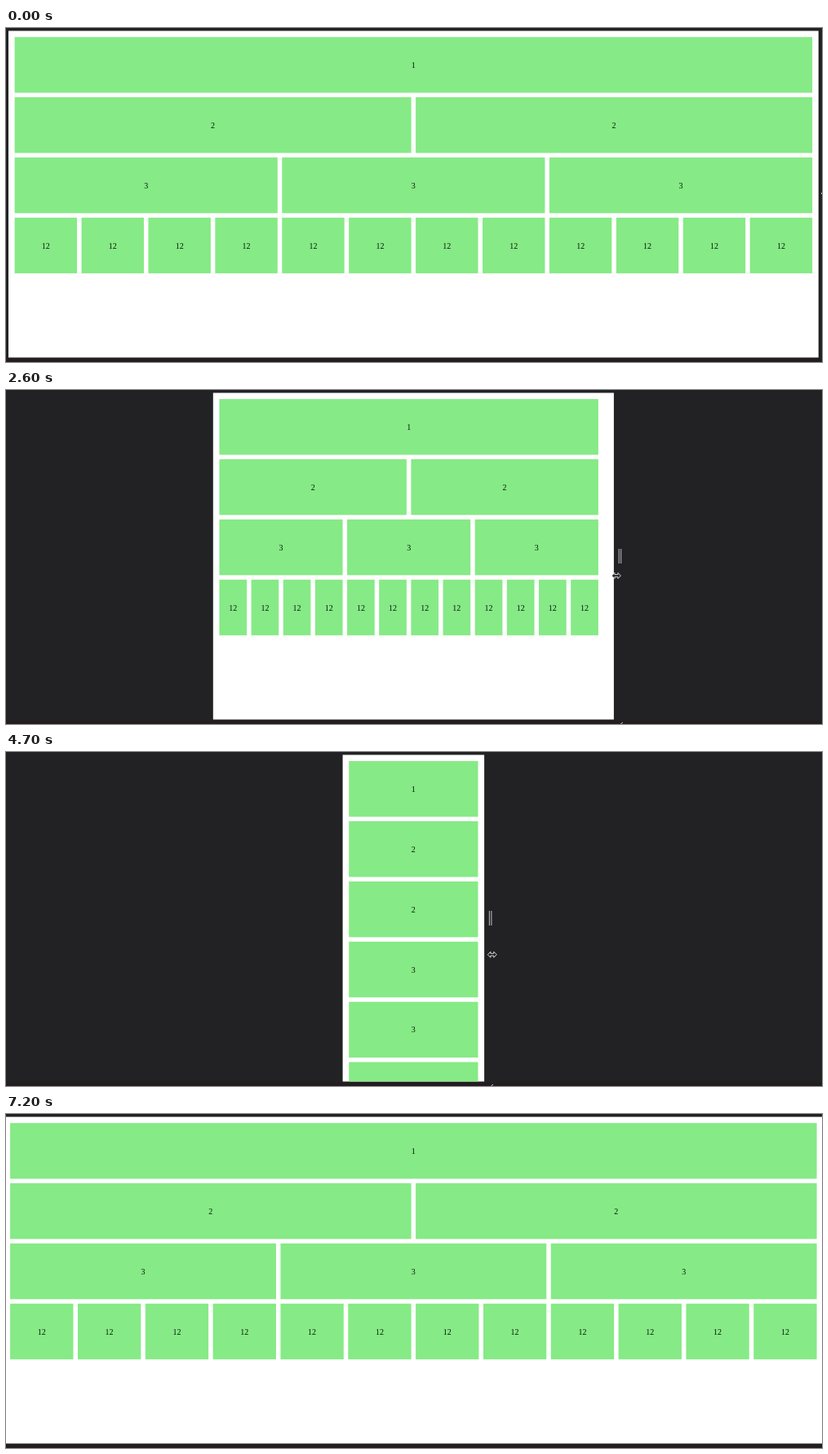
An HTML page that plays this animation: 1000 by 410 pixels, repeating every 7.3 s.

```html
<!DOCTYPE html>
<html lang="en">
<head>
<meta charset="utf-8">
<title>Responsive grid</title>
<style>
  html, body { margin: 0; width: 100%; height: 100%; overflow: hidden; background: #222123; }
  svg { display: block; width: 1000px; height: 410px; }
  text { font: 10px "Liberation Serif", Times, serif; text-anchor: middle; fill: #0b180b; }
</style>
</head>
<body>
<svg viewBox="0 0 1000 410">
  <defs><clipPath id="clip"><rect id="clipBox" y="3.5" height="401"/></clipPath></defs>
  <rect width="1000" height="410" fill="#222123"/>
  <rect y="406" width="1000" height="4" fill="#241d20"/>
  <rect id="page" y="3.5" height="401" fill="#fff"/>
  <g id="cells" clip-path="url(#clip)" fill="#86ea86"></g>
  <g id="grip" stroke="#b4b4b5" fill="none">
    <path d="M6.3 195V213M8.8 195V213" stroke-width="1.1"/>
    <path d="M8 410.5l3-2.6" stroke="#cfcfcf"/>
  </g>
  <path id="resize" d="M-5.5 0L-2 -3.6V-1.4H2V-3.6L5.5 0L2 3.6V1.4H-2V3.6Z"
    fill="#222" stroke="#e8e8e8" stroke-width=".9" stroke-linejoin="round"/>
  <path id="arrow" d="M0 0V11.4L2.6 9L4.4 13L6.2 12.2L4.5 8.3H7.8Z"
    fill="#1b1b1c" stroke="#e8e8e8" stroke-width=".9" stroke-linejoin="round"/>
</svg>
<script>
const LOOP = 7300, STEP = 100, MID = 499.35;
const MARGIN = 7.6, TOP = 11.1, ROW = 68.4, GAP = 5.5, BREAKPOINT = 416;

const linear = u => u;
const power = p => u => u ** p;
const slowDown = u => 1 - (1 - u) ** 1.5;

// key points: time, value, easing towards the next point
const edge = [[900, 3], [1400, 74], [1700, 74], [2500, 197], [2600, 253.8], [3300, 326],
  [3400, 326, slowDown], [4500, 415], [4700, 412.6, power(1.5)], [5700, 195.2], [6400, -2.5]];
const reach = [[900, 9], [2600, 3], [3400, 2.4], [4700, 9.7, power(3)], [5700, 104.5]];
const height = [[1400, 203], [2600, 228], [3400, 233, power(1.3)], [5700, 266]];

const $ = id => document.getElementById(id);
const move = (id, x, y) => $(id).setAttribute("transform", `translate(${x} ${y})`);
const set = (el, attrs) => { for (const k in attrs) el.setAttribute(k, attrs[k]); };

function at(keys, t) {
  const i = keys.findIndex(k => k[0] > t);
  if (i === 0) return keys[0][1];
  if (i < 0) return keys[keys.length - 1][1];
  const [t0, a, ease = linear] = keys[i - 1], [t1, b] = keys[i];
  return a + (b - a) * ease((t - t0) / (t1 - t0));
}

function add(tag) {
  const el = document.createElementNS("http://www.w3.org/2000/svg", tag);
  return $("cells").appendChild(el);
}

const cells = [];
[1, 2, 3, 12].forEach((cols, row) => {
  for (let col = 0; col < cols; col++) {
    const cell = { cols, row, col, box: add("rect"), label: add("text") };
    cell.label.textContent = cols;
    cells.push(cell);
  }
});

function draw(time) {
  const t = Math.floor(time % LOOP / STEP) * STEP;
  const left = at(edge, t), width = 2 * (MID - left), right = left + width;
  set($("page"), { x: left, width });
  set($("clipBox"), { x: left, width });

  // the grid runs ahead of the viewport when it shrinks fast
  const speed = left - at(edge, t - STEP);
  const inner = width - 2 * MARGIN - Math.max(0, speed - 25) * 0.36;
  const stacked = width < BREAKPOINT;
  cells.forEach(({ cols, row, col, box, label }, i) => {
    const n = stacked ? 1 : cols;
    const w = (inner - GAP * (n - 1)) / n;
    const x = left + MARGIN + (stacked ? 0 : col * (w + GAP));
    const y = TOP + (stacked ? i : row) * (ROW + GAP);
    set(box, { x, y, width: w, height: ROW });
    set(label, { x: x + w / 2, y: y + ROW / 2 + 3.5 });
  });

  const pointing = t >= 1400 && t < 1600;
  $("resize").style.display = pointing ? "none" : "";
  $("arrow").style.display = pointing ? "" : "none";
  move("grip", right, 0);
  move("resize", right + at(reach, t), at(height, t));
  move("arrow", right + 8, 201.5);
}

const start = performance.now();
function tick() {
  draw(performance.now() - start);
  requestAnimationFrame(tick);
}
tick();
</script>
</body>
</html>
```
